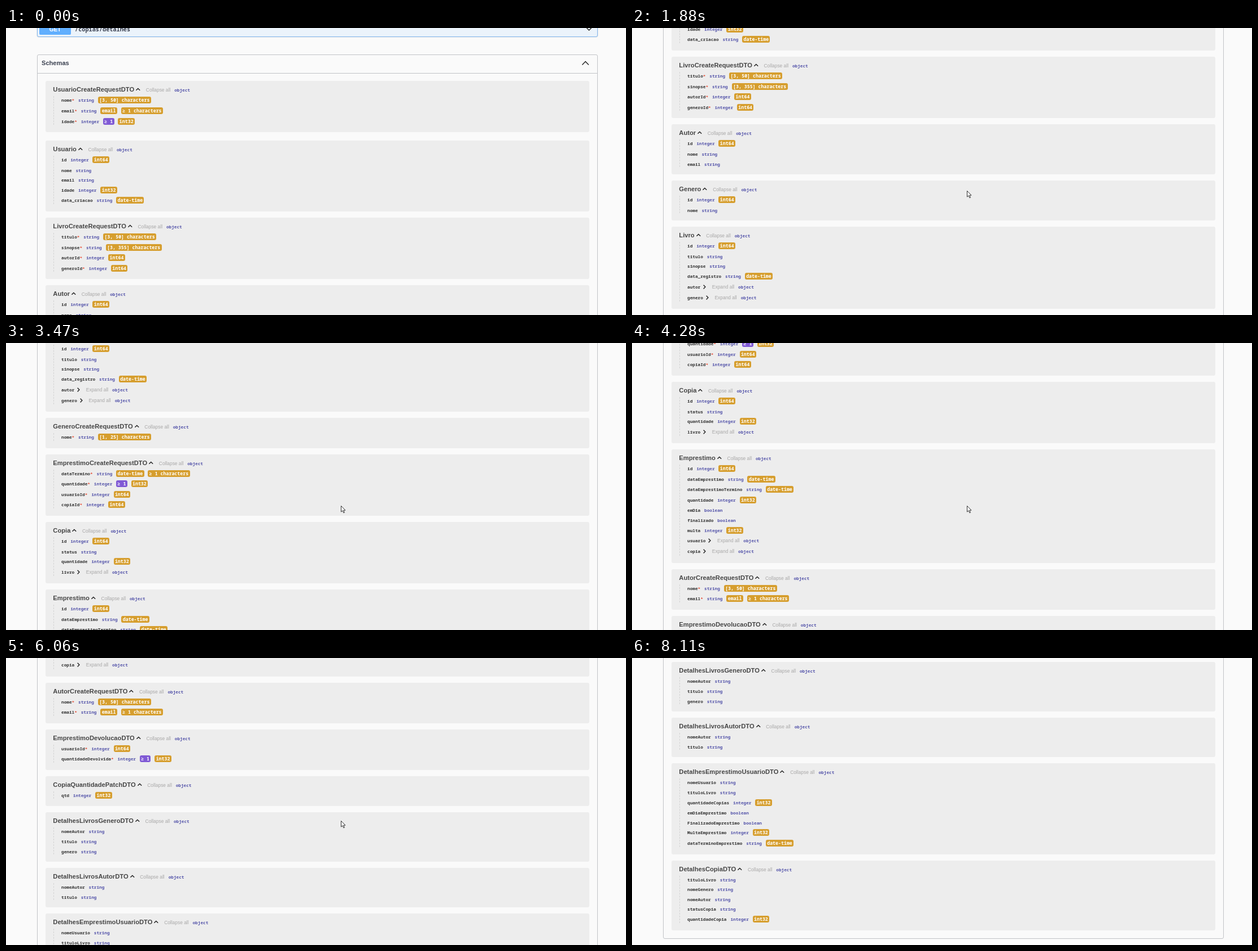
An HTML page that plays this animation: 1098x510 px, repeating every 8770 ms.

```html
<!DOCTYPE html>
<html lang="pt">
<head>
<meta charset="utf-8">
<title>Schemas</title>
<style>
html, body { margin: 0; width: 100%; height: 100%; overflow: hidden; background: #fafafa; }
#stage { position: relative; width: 1098px; height: 510px; overflow: hidden; background: #fafafa;
  font: bold 7.73px/12px "Noto Sans Mono", monospace; color: #333; white-space: pre; }
#page, #section, #cards, #get, #get *, #section > *, #cursor { position: absolute; box-sizing: border-box; }
#page { left: 0; top: 0; width: 1098px; height: 2060px; }
svg { display: block; overflow: visible; fill: none; stroke: #222; stroke-width: 1.4; }

#get { left: 55px; top: -12px; width: 993px; height: 28px; border: 1px solid #7fb4ec; border-radius: 3px;
  background: #ebf3fb; box-shadow: 0 0 2px rgba(0,0,0,.19); }
#get b { left: 3px; top: 0; width: 56px; height: 23px; border-radius: 2px; background: #61affe; color: #fff;
  font: bold 10px/27px "Liberation Sans", Arial, sans-serif; text-align: center; }
#get span { left: 66px; top: 7px; font-size: 10.22px; color: #3b4151; }
#get svg { left: 971px; top: 9px; }

#section { left: 55px; top: 47px; width: 993px; height: 1989px; border: 1px solid #c1c3c7; border-radius: 3px; }
#section h4 { left: 0; top: 0; width: 991px; height: 33px; margin: 0; padding-left: 7px; border-bottom: 1px solid #c1c3c7;
  font: bold 11.1px/29px "Liberation Sans", Arial, sans-serif; color: #3b4151; }
#section svg { left: 964px; top: 10px; }

#cards { left: 70px; top: 94.4px; width: 963px; }
.card { position: relative; margin-bottom: 11px; padding: 9px 0 7px 28px; border-radius: 3px; background: #ededed; }
.card:first-child { margin-bottom: 14.8px; }
.card::before { content: ""; position: absolute; left: 14px; top: 27px; bottom: 13px; border-left: 1px dashed rgba(0,0,0,.11); }
.title, .row { display: flex; height: 12px; }
.title { margin: 0 0 7px -14.7px; align-items: baseline; }
.title svg { align-self: center; }
.title b { font: bold 11.18px/12px "Liberation Sans", Arial, sans-serif; color: #464646; }
.row { align-items: center; margin-bottom: 5.6px; }
.badged { margin-bottom: 6.6px; }
.nested { margin-bottom: 7.2px; }
.row i { font-style: normal; color: #e5533d; }
.toggle { font: 8.42px/12px "Liberation Sans", Arial, sans-serif; color: #a9a8a8; }
.type { margin-left: 6.9px; color: #55a; }
.badge { margin-left: 6.9px; padding: 0 2.35px; border-radius: 3px; background: #d69e2e; color: #fff; font-size: 8.27px; }
.min { background: #805ad5; }
#cursor { left: 0; top: 0; stroke: #333; stroke-width: 1; fill: #fff; }
</style>
</head>
<body>
<div id="stage">
  <div id="page">
    <div id="get"><b>GET</b><span>/copias/detalhes</span>
      <svg width="12" height="8"><path d="M1 1.5l4.5 4.5 4.5-4.5"/></svg></div>
    <div id="section"><h4>Schemas</h4>
      <svg width="12" height="8"><path d="M.5 7.5l5.7-6 5.7 6"/></svg></div>
    <div id="cards"></div>
  </div>
  <svg id="cursor" width="9" height="14"><path d="M.5.5v10.6l2.5-2.3 1.9 4.1 1.6-.7-1.8-4h3.3z"/></svg>
</div>
<script>
// Heading lines start a schema; indented lines are fields: name|type|badges, or name|> when nested.
const schemas = `UsuarioCreateRequestDTO
 nome*|string|[3, 50] characters
 email*|string|email|≥ 1 characters
 idade*|integer|≥ 1|int32
Usuario
 id|integer|int64
 nome|string
 email|string
 idade|integer|int32
 data_criacao|string|date-time
LivroCreateRequestDTO
 titulo*|string|[3, 50] characters
 sinopse*|string|[3, 355] characters
 autorId*|integer|int64
 generoId*|integer|int64
Autor
 id|integer|int64
 nome|string
 email|string
Genero
 id|integer|int64
 nome|string
Livro
 id|integer|int64
 titulo|string
 sinopse|string
 data_registro|string|date-time
 autor|>
 genero|>
GeneroCreateRequestDTO
 nome*|string|[1, 25] characters
EmprestimoCreateRequestDTO
 dataTermino*|string|date-time|≥ 1 characters
 quantidade*|integer|≥ 1|int32
 usuarioId*|integer|int64
 copiaId*|integer|int64
Copia
 id|integer|int64
 status|string
 quantidade|integer|int32
 livro|>
Emprestimo
 id|integer|int64
 dataEmprestimo|string|date-time
 dataEmprestimoTermino|string|date-time
 quantidade|integer|int32
 emDia|boolean
 finalizado|boolean
 multa|integer|int32
 usuario|>
 copia|>
AutorCreateRequestDTO
 nome*|string|[3, 50] characters
 email*|string|email|≥ 1 characters
EmprestimoDevolucaoDTO
 usuarioId*|integer|int64
 quantidadeDevolvida*|integer|≥ 1|int32
CopiaQuantidadePatchDTO
 qtd|integer|int32
DetalhesLivrosGeneroDTO
 nomeAutor|string
 titulo|string
 genero|string
DetalhesLivrosAutorDTO
 nomeAutor|string
 titulo|string
DetalhesEmprestimoUsuarioDTO
 nomeUsuario|string
 tituloLivro|string
 quantidadeCopias|integer|int32
 emDiaEmprestimo|boolean
 FinalizadoEmprestimo|boolean
 MultaEmprestimo|integer|int32
 dataTerminoEmprestimo|string|date-time
DetalhesCopiaDTO
 tituloLivro|string
 nomeGenero|string
 nomeAutor|string
 statusCopia|string
 quantidadeCopia|integer|int32`;

const span = (cls, text) => `<span class="${cls}">${text}</span>`;
const toggle = (path, text) =>
  `<svg width="20.7" height="12"><path d="${path}"/></svg>` + span('toggle', text) + span('type', 'object');
const badge = text => span(text === '≥ 1' ? 'badge min' : 'badge', text);

function row(line) {
  const [name, type, ...badges] = line.trim().split('|');
  const label = `<span>${name.replace('*', '<i>*</i>')}</span>`;
  if (type === '>') return `<div class="row nested">${label}${toggle('M5.6 2.8l3.3 3.3-3.3 3.3', 'Expand all')}</div>`;
  const cls = badges.length ? 'row badged' : 'row';
  return `<div class="${cls}">${label}${span('type', type)}${badges.map(badge).join('')}</div>`;
}

function card(text) {
  const [name, ...fields] = text.split('\n');
  const head = `<div class="title"><b>${name}</b>${toggle('M3.4 7.8l3.4-3.4 3.4 3.4', 'Collapse all')}</div>`;
  return `<div class="card">${head}${fields.map(row).join('')}</div>`;
}

const page = document.getElementById('page');
const cursor = document.getElementById('cursor');
document.getElementById('cards').innerHTML = schemas.split(/\n(?! )/).map(card).join('');

const LOOP = 8770, STEP = 65;
const mix = (a, b, u) => a + (b - a) * u;
const easeOut = (u, power) => 1 - (1 - u) ** power;
const overshoot = u => 1 + 1.9 * (u - 1) ** 3 + .9 * (u - 1) ** 2;

// Progress from 0 to 1 in held steps; the first step lands at the start time.
const progress = (t, start, steps) =>
  Math.min(Math.max(Math.floor((t - start) / STEP) + 1, 0), steps) / steps;

// Bursts of the mouse wheel: start time, steps, scroll position reached.
const bursts = [[1120, 18, 354], [2770, 11, 663], [3800, 18, 1088], [5320, 6, 1230], [6060, 8, 1453], [6820, 4, 1537]];

const scrollAt = t => bursts.reduce((y, [start, steps, to]) => mix(y, to, easeOut(progress(t, start, steps), 1.5)), 0);

// The pointer flies in from below the stage, rests, then leaves downwards.
function pointerAt(t) {
  const enter = progress(t, 320, 7), leave = progress(t, 7690, 7);
  return [
    mix(1392, 593, overshoot(enter)) - 139 * leave,
    mix(541, 289, easeOut(enter, 2)) + 231 * leave
  ];
}

const start = performance.now();
function draw() {
  const t = (performance.now() - start) % LOOP;
  const [x, y] = pointerAt(t).map(Math.round);
  page.style.transform = `translateY(${-Math.round(scrollAt(t))}px)`;
  cursor.style.transform = `translate(${x}px, ${y}px)`;
  requestAnimationFrame(draw);
}
draw();
</script>
</body>
</html>
```
